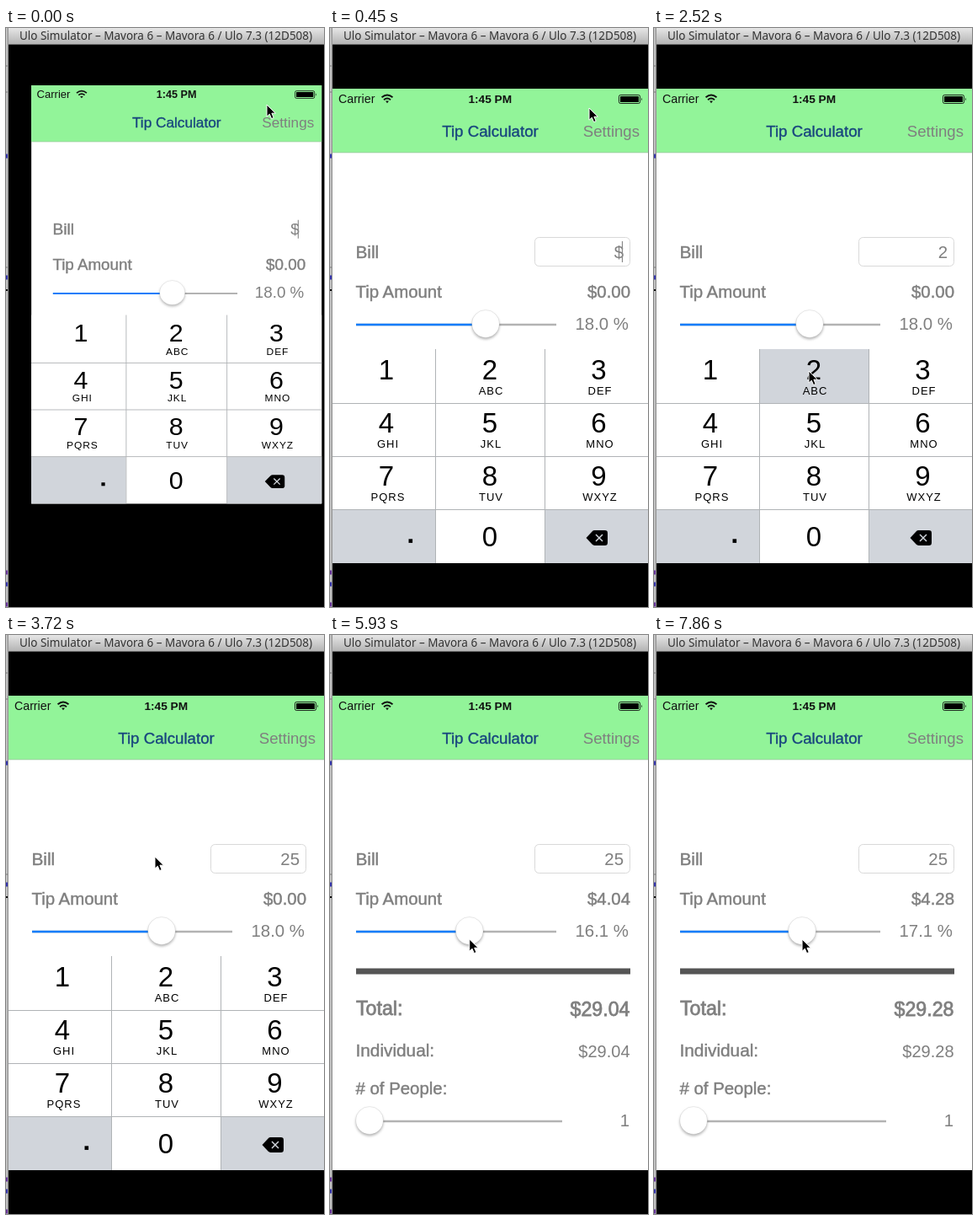
An HTML page that plays this animation: 378x687 px, repeating every 8000 ms.

```html
<!DOCTYPE html>
<html lang="en">
<head>
<meta charset="utf-8">
<title>Tip Calculator</title>
<style>
  html, body { margin: 0; width: 100%; height: 100%; overflow: hidden; background: #000; }
  svg { display: block; width: 378px; height: 687px; }
  text { font: 20.4px "Liberation Sans", Arial, sans-serif; fill: #7f7f7f; white-space: pre; }
  .med { stroke: #7f7f7f; stroke-width: .45; }
  .big { font-size: 23.2px; stroke: #7f7f7f; stroke-width: .8; }
  .end { text-anchor: end; }
  .mid, .key { text-anchor: middle; }
  .bar { font: 13.5px "Noto Sans", "Open Sans", sans-serif; fill: #333; }
  .key { font-size: 33px; fill: #000; }
  .abc { font-size: 13px; letter-spacing: 1px; }
  .knob { fill: #fff; stroke: rgba(0,0,0,.13); stroke-width: .7; filter: drop-shadow(0 2px 1.8px rgba(0,0,0,.28)); }
</style>
</head>
<body>
<svg viewBox="0 0 378 687">
  <defs>
    <linearGradient id="metal" x2="0" y2="1"><stop stop-color="#e6e6e6"/><stop offset="1" stop-color="#b4b4b4"/></linearGradient>
    <linearGradient id="edge"><stop stop-color="#d6d6d6"/><stop offset="1" stop-color="#8c8c8c"/></linearGradient>
    <clipPath id="glass"><rect x="3" y="72" width="375" height="563"/></clipPath>
  </defs>

  <rect width="378" height="687"/>
  <rect width="3" height="687" fill="url(#edge)"/>
  <path d="M0 45h2M0 76h2M0 284h2" stroke="#777"/>
  <path d="M0 152h2M0 296h2M0 660h2" stroke="#33a" stroke-width="5"/>
  <path d="M0 646h2M0 684h2" stroke="#639" stroke-width="5"/>
  <path d="M0 311h2" stroke="#000" stroke-width="2"/>
  <rect x="3" width="375" height="19" fill="url(#metal)"/>
  <path d="M3 19.5H378" stroke="#666"/>
  <text class="bar mid" x="190" y="14">Ulo Simulator – Mavora 6 – Mavora 6 / Ulo 7.3 (12D508)</text>

  <g id="screen" clip-path="url(#glass)">
    <rect x="3" y="72" width="375" height="563" fill="#fff"/>
    <rect x="3" y="72" width="375" height="76" fill="#92f499"/>
    <path d="M3 147.8H378" stroke="#a3c9a5" stroke-width=".8"/>
    <text x="10" y="89" style="font-size:14.2px;fill:#111">Carrier</text>
    <g fill="none" stroke="#111" stroke-width="1.9">
      <path d="M61.5 82.3Q68 76.7 74.5 82.3M64 85.2Q68 81.7 72 85.2"/>
      <path d="M66 86.6h4l-2 2.6z" fill="#111" stroke="none"/>
    </g>
    <text class="mid" x="190.3" y="89" style="font-size:13.7px;font-weight:bold;fill:#111">1:45 PM</text>
    <rect x="343.5" y="79.5" width="25" height="10" rx="1.8" fill="none" stroke="#111" stroke-width=".9"/>
    <rect x="345" y="81" width="22" height="7" rx=".6"/>
    <path d="M370 82.6q1.6 1.9 0 3.8z"/>
    <text class="mid" x="190.5" y="128.5" style="font-size:18.7px;fill:#17447e;stroke:#17447e;stroke-width:.35">Tip Calculator</text>
    <text class="end" x="368" y="128.5" style="font-size:18.6px">Settings</text>

    <text class="med" x="30.5" y="273" style="font-size:20.8px">Bill</text>
    <rect id="field" x="243.5" y="248.5" width="113" height="34" rx="5" fill="none" stroke="#d9d9d9"/>
    <text class="end" id="bill" x="349" y="273"></text>
    <path id="caret" d="M347.5 253V278" stroke="#888" stroke-width="1.2"/>
    <text class="med" x="30.5" y="320">Tip Amount</text>
    <text class="med end" id="tip" x="357" y="320"></text>
    <path d="M31 352H269" stroke="#b3b3b3" stroke-width="2.4"/>
    <path id="fill" stroke="#0f7dfa" stroke-width="2.4"/>
    <circle class="knob" id="knob" cy="351" r="16.4"/>
    <text class="end" id="rate" x="355" y="358"></text>

    <rect x="31" y="395.5" width="326" height="7" fill="#555"/>
    <text class="big" x="31" y="450.5">Total:</text>
    <text class="big end" id="total" x="356.5" y="452">$</text>
    <text class="med" x="30.5" y="500" style="font-size:20.8px">Individual:</text>
    <text class="end" id="each" x="356.5" y="501" style="font-size:20px"></text>
    <text class="med" x="30.5" y="545">&#35; of People:</text>
    <path d="M31 577H276" stroke="#b3b3b3" stroke-width="2.4"/>
    <circle class="knob" cx="47" cy="576" r="16.4"/>
    <text class="end" x="356" y="583">1</text>

    <g id="pad">
      <rect x="3" y="381" width="375" height="254" fill="#fff"/>
      <path d="M3 572H125V635H3zM256 572H378V635H256z" fill="#d1d5db"/>
      <rect id="press" x="126" y="381" width="129" height="64" fill="#d1d5db"/>
      <path d="M125.5 381V635M255.5 381V635M3 445.5H378M3 508.5H378M3 571.5H378" stroke="#b0b3b6" fill="none"/>
      <g id="keys"></g>
      <rect x="93.5" y="606.3" width="4.6" height="4.6"/>
      <path d="M304.5 605l7-7.6q1.3-1.4 3-1.4h12.3q3.2 0 3.2 3.2v11.6q0 3.2-3.2 3.2h-12.3q-1.7 0-3-1.4z"/>
      <path d="M316 601l8 8m0-8l-8 8" stroke="#d1d5db" stroke-width="1.5"/>
    </g>
  </g>

  <path id="mouse" d="M0 0V14.2L3.3 11.2L5.6 16.6L8.2 15.5L5.9 10.2H10.4Z" stroke="#fff" stroke-width="1"/>
</svg>
<script>
const $ = id => document.getElementById(id);
const LOOP = 8000, STEP = 148.04, LAST = 53;

const letters = ['', 'ABC', 'DEF', 'GHI', 'JKL', 'MNO', 'PQRS', 'TUV', 'WXYZ'];
const key = (label, x, y) => `<text class="key" x="${x}" y="${y}">${label}</text>`;
$('keys').innerHTML = letters.map((abc, i) => {
  const x = [67, 190, 319.5][i % 3], y = 416.5 + 63.2 * Math.floor(i / 3);
  const dx = i % 3 ? 1.5 : 2;
  return key(i + 1, x, y) + `<text class="key abc" x="${x + dx}" y="${y + 18}">${abc}</text>`;
}).join('') + key(0, 190, 615);

// Rows of [step, value, ...], linear in between
const track = (rows, n) => {
  const i = rows.findIndex(r => r[0] > n);
  if (i < 0) return rows.at(-1).slice(1);
  const a = rows[i - 1], b = rows[i], k = (n - a[0]) / (b[0] - a[0]);
  return a.slice(1).map((v, j) => v + (b[j + 1] - v) * k);
};

const zoom = [[0, 0], [1, .72], [2, .96], [3, 1]];
const percent = [[0, 17.96], [37, 17.96], [39, 17.2], [43, 13], [45, 12.2], [46, 12.04], [49, 12.04], [53, 17.12]];
const slide = [[0, 0], [25, 0], [26, 70], [27, 205], [28, 260]];
const path = [
  [0, 310, 91], [3, 308, 95], [4, 309, 105], [7, 326, 250], [8, 327, 262], [11, 319, 263],
  [12, 285, 325], [13, 215, 425], [14, 153, 467], [15, 168, 440], [16, 184, 407], [17, 184, 407],
  [19, 186, 473], [22, 186, 473], [24, 179, 300], [25, 177, 263], [27, 178, 264],
  [30, 199, 428], [31, 201, 438], [32, 209, 425], [34, 201, 377], [36, 182, 355], [37, 182, 355]
];

function draw(n) {
  const [k] = track(zoom, n), [p] = track(percent, n), [drop] = track(slide, n);
  const x = 185 + (p - 17.96) * 10.65, done = n >= 26;
  const tip = done ? +(25 * p / 100).toFixed(2) : 0;
  const mix = (a, b) => a + (b - a) * k;
  $('screen').setAttribute('transform',
    `matrix(${mix(.921, 1)} 0 0 ${mix(.882, 1)} ${mix(27.3, 0)} ${mix(4.5, 0)})`);
  $('field').setAttribute('opacity', k);
  $('caret').setAttribute('opacity', n < 9 ? 1 : 0);
  $('bill').textContent = n < 17 ? '$' : n < 21 ? '2' : '25';
  $('tip').textContent = '$' + tip.toFixed(2);
  $('rate').textContent = p.toFixed(1) + ' %';
  $('total').textContent = $('each').textContent = '$' + (25 + tip).toFixed(2);
  $('fill').setAttribute('d', `M31 352H${x}`);
  $('knob').setAttribute('cx', x);
  $('press').setAttribute('opacity', n === 17 ? 1 : 0);
  $('pad').setAttribute('transform', `translate(0 ${drop})`);
  const [mx, my] = n < 38 ? track(path, n) : [x - (p < 15 ? 2.5 : 0), 361];
  $('mouse').setAttribute('transform', `translate(${mx} ${my})`);
}

function tick(now) {
  draw(Math.min(LAST, Math.floor(now % LOOP / STEP)));
  requestAnimationFrame(tick);
}
draw(0);
requestAnimationFrame(tick);
</script>
</body>
</html>
```
